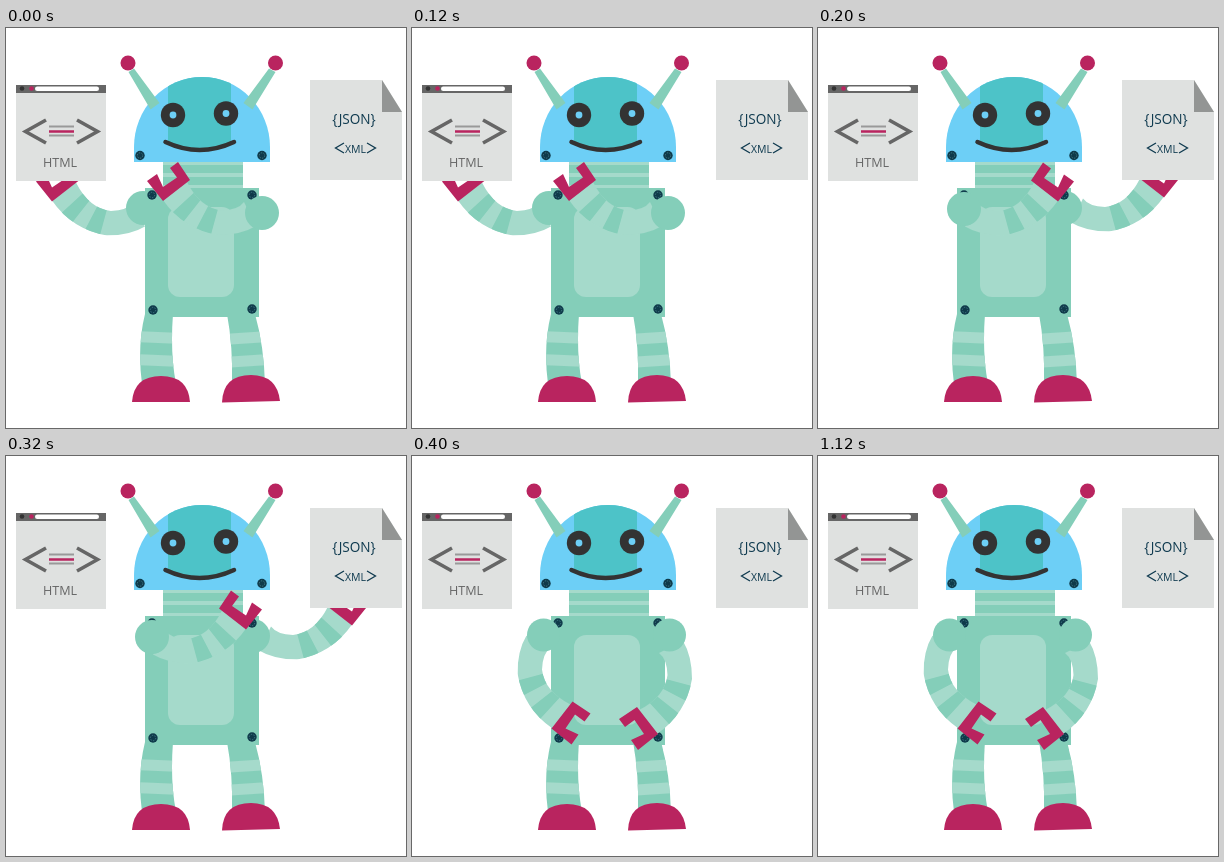
Write an HTML page that moves like this. It is 400 px wide and 400 px high and loops after 1600 ms.

```html
<!DOCTYPE html>
<html lang="en">
<head>
<meta charset="utf-8">
<title>Robot waving arms</title>
<style>
  html, body { margin: 0; width: 100%; height: 100%; overflow: hidden; background: #fff; }
  svg { display: block; width: 100vw; height: 100vh; }
  text { font-family: "Open Sans", "Noto Sans", sans-serif; text-anchor: middle; }
  .mint { fill: #84ceb9; }
  .pale { fill: #a5dacb; }
  .pink { fill: #b9245f; }
  .dark { fill: #333; }
  .paper { fill: #dfe1e0; }
  .bands { fill: none; stroke: #84ceb9; stroke-width: 44; stroke-dasharray: 0 14 12 12 13 99; }
  .line { fill: none; stroke: #666; stroke-width: 3.6; }
</style>
</head>
<body>
<svg viewBox="0 0 400 400">
  <defs>
    <clipPath id="dome"><path d="M128 134V119A68 70 0 0 1 264 119V134Z"/></clipPath>
    <clipPath id="legL"><path d="M139 286Q131 318 136 356H170Q164 325 167 286Z"/></clipPath>
    <clipPath id="legR"><path d="M221 286Q227 318 226 356H259Q258 318 249 286Z"/></clipPath>
    <clipPath id="sleeve">
      <path d="M157 172Q177 201 212 207Q235 207 250 198L238 174Q232 182 216 182.500Q194 180 181 154Z"/>
    </clipPath>
    <g id="arm">
      <g clip-path="url(#sleeve)">
        <path class="pale" d="M150 145h110v70h-110z"/>
        <path class="bands" d="M169 163Q188 191 216 195Q236 194 250 182"/>
      </g>
      <path class="pink" d="M141 153L151 146L157 159L171 149.500L164 140L172 134L184 152L157 173Z"/>
    </g>
    <g id="screw">
      <circle r="4.7" fill="#0f3a4a"/>
      <circle r="2.7" fill="none" stroke="#4b8791" stroke-width=".8" stroke-dasharray="1.4 1.4"/>
    </g>
    <g id="eye">
      <circle class="dark" r="12.2"/>
      <circle r="3.4" fill="#6dcff6"/>
    </g>
  </defs>

  <!-- raised arms, behind the body -->
  <g data-pose="0">
    <use href="#arm" x="-111" y=".5"/>
    <circle class="mint" cx="137" cy="180" r="17"/>
  </g>
  <g data-pose="1">
    <use href="#arm" transform="matrix(-1 0 0 1 503 -3.5)"/>
    <circle class="mint" cx="247" cy="180" r="17"/>
  </g>

  <!-- legs and feet -->
  <g clip-path="url(#legL)">
    <path class="mint" d="M130 286h45v70h-45z"/>
    <path class="pale" d="M130 303L175 305V316L130 314ZM130 326L175 328V339L130 337Z"/>
  </g>
  <g clip-path="url(#legR)">
    <path class="mint" d="M218 286h45v70h-45z"/>
    <path class="pale" d="M218 306L263 303V314L218 317ZM218 329L263 326V337L218 340Z"/>
  </g>
  <path class="pink" d="M126 374Q128 348 155 348Q182 348 184 374Z"/>
  <path class="pink" d="M216 374.500Q217 347 245 347Q271 347 274 373Z"/>

  <!-- neck and torso -->
  <path class="mint" d="M157 134h80v26h-80zM139 160h114v129h-114z"/>
  <path class="pale" d="M157 134h80v3h-80zM157 145h80v4h-80zM157 157h80v3h-80z"/>
  <rect class="pale" x="162" y="179" width="66" height="90" rx="12"/>
  <use href="#screw" x="146" y="167"/>
  <use href="#screw" x="246" y="167"/>
  <use href="#screw" x="147" y="282"/>
  <use href="#screw" x="246" y="281"/>

  <!-- head -->
  <g clip-path="url(#dome)">
    <path fill="#6dcff6" d="M128 49h136v85h-136z"/>
    <path fill="#4dc3c8" d="M162 49h63v66Q193 130 162 115z"/>
  </g>
  <path class="mint" d="M122.500 44L128 40.500L153.500 75L144.500 81.500ZM269.500 44L263 40.500L237.500 75L246.500 81.500Z"/>
  <circle class="pink" cx="122" cy="35" r="7.5"/>
  <circle class="pink" cx="269.500" cy="35" r="7.5"/>
  <use href="#eye" x="167" y="87"/>
  <use href="#eye" x="220" y="85.500"/>
  <path d="M159.500 114Q193.500 130 228 114" fill="none" stroke="#333" stroke-width="4.500" stroke-linecap="round"/>
  <use href="#screw" x="134" y="127.500"/>
  <use href="#screw" x="256" y="127.500"/>

  <!-- arms in front of the body -->
  <g data-pose="0">
    <use href="#arm"/>
    <circle class="mint" cx="256" cy="185" r="17"/>
  </g>
  <g data-pose="1">
    <use href="#arm" transform="matrix(-1 0 0 1 397 .5)"/>
    <circle class="mint" cx="146" cy="181" r="17"/>
  </g>
  <g data-pose="2">
    <use href="#arm" transform="matrix(0 -1 -1 0 312.500 429.500)"/>
    <use href="#arm" transform="matrix(0 -1 1 0 73 435)"/>
    <circle class="mint" cx="131.500" cy="179" r="16.500"/>
    <circle class="mint" cx="257.500" cy="179" r="16.500"/>
  </g>

  <!-- browser window -->
  <path class="paper" d="M10 57h90v96h-90z"/>
  <path fill="#666" d="M10 57h90v8h-90z"/>
  <rect x="29" y="58.500" width="64" height="4.500" rx="2.250" fill="#fff"/>
  <circle class="dark" cx="16" cy="60.500" r="2.300"/>
  <circle class="pink" cx="25.500" cy="60.500" r="2.300"/>
  <path class="line" d="M40 92L19.500 103.500L40 115M71 92L91.500 103.500L71 115"/>
  <path d="M43 98.500h25M43 107.500h25" stroke="#999" stroke-width="2"/>
  <path d="M43 103.500h25" stroke="#b9245f" stroke-width="2.500"/>
  <text x="54" y="139" font-size="12.600" fill="#666">HTML</text>

  <!-- data file -->
  <path class="paper" d="M304 52h72l20 32v68h-92z"/>
  <path fill="#939594" d="M376 52L396 84H376Z"/>
  <g fill="#0f3a4f">
    <text x="348" y="96" font-size="13.600">{JSON}</text>
    <text x="349.500" y="125" font-size="10.500">XML</text>
    <path d="M338 115L329.500 120L338 125M361 115L369.500 120L361 125" fill="none" stroke="#0f3a4f" stroke-width="1.300"/>
  </g>
</svg>
<script>
  const LOOP = 1600, STEP = 200;
  const poses = document.querySelectorAll("[data-pose]");
  const start = performance.now();

  function draw() {
    const t = (performance.now() - start) % LOOP;
    const pose = Math.min(2, Math.floor(t / STEP));
    for (const g of poses) g.style.display = +g.dataset.pose === pose ? "" : "none";
    requestAnimationFrame(draw);
  }
  draw();
</script>
</body>
</html>
```
